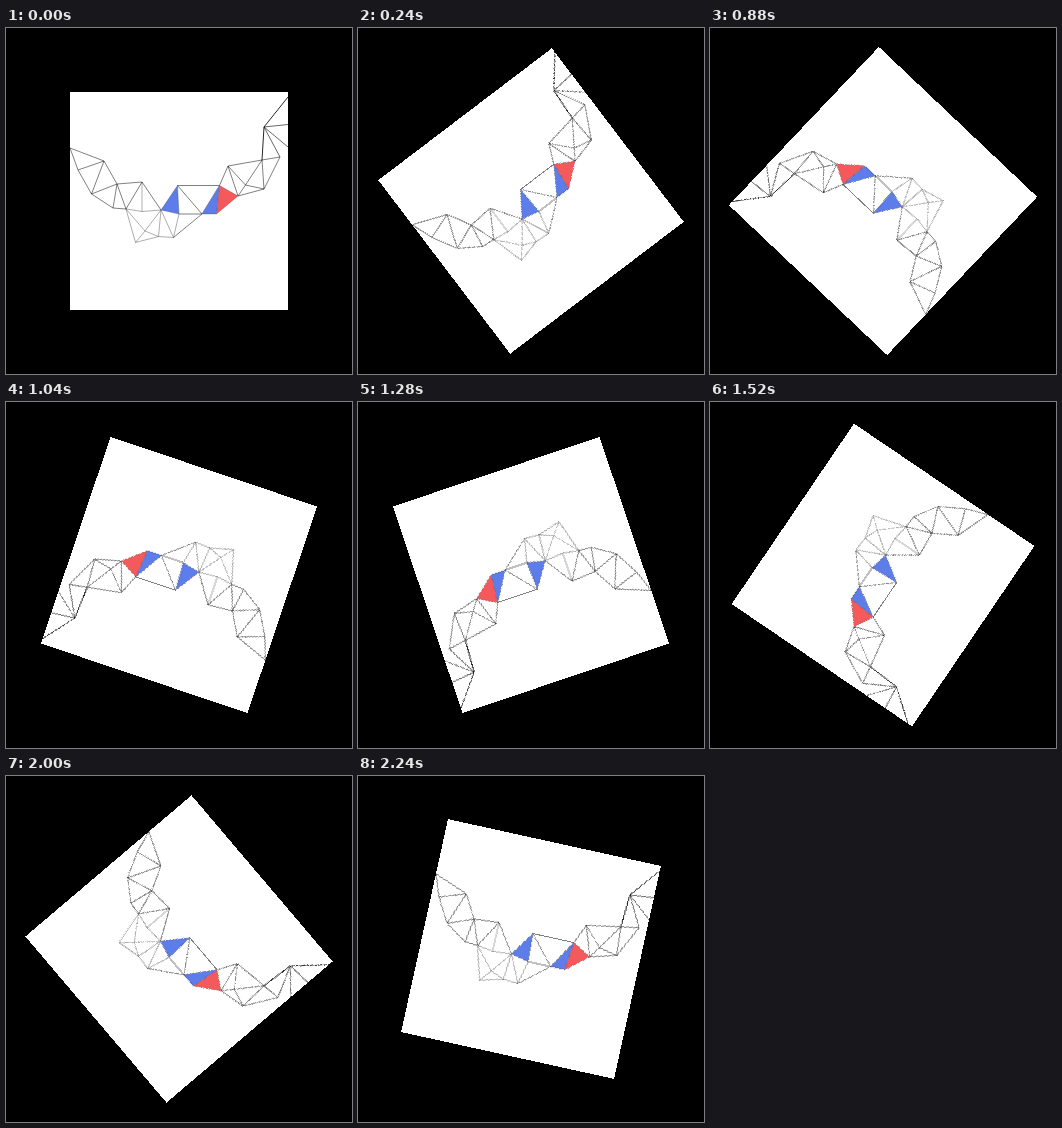
An HTML page with a canvas for the animation above (2.32 s loop, 346x346 px).

```html
<!DOCTYPE html>
<html lang="en">
<head>
<meta charset="utf-8">
<title>Rotating triangle strip</title>
<style>
  html, body { margin: 0; width: 100%; height: 100%; overflow: hidden; background: #000; }
  canvas { display: block; }
</style>
</head>
<body>
<canvas id="stage" width="346" height="346"></canvas>
<script>
const SIZE = 346, MID = SIZE / 2, STEP = 80, STEPS = 29;

const points = {
  A: [64, 120], B: [98, 133], C: [72, 142], D: [85.5, 166], E: [111, 156],
  F: [107, 180], G: [120, 181], H: [136, 154], I: [136, 183.5], J: [155, 182],
  K: [129.5, 214.5], L: [167.5, 209.5], M: [152.5, 208.5], N: [139, 203],
  P: [196, 186], Q: [173, 186], R: [171.5, 157.5], S: [213.5, 157.5],
  T: [210.5, 186], U: [232, 168], V: [222, 138], W: [256, 132], X: [258, 161],
  Y: [239.5, 157], Z: [274, 129], a: [258, 99], b: [282, 69], c: [282, 96.5], d: [282, 119]
};

// The sheet is drawn once, then turned without smoothing for crisp pixels.
const sheet = document.createElement('canvas');
sheet.width = sheet.height = SIZE;
const pen = sheet.getContext('2d');

function trace(lines) {
  pen.beginPath();
  for (const line of lines.split(' '))
    [...line].forEach((key, i) => pen[i ? 'lineTo' : 'moveTo'](...points[key]));
}

function stroke(lines, color, width) {
  trace(lines);
  pen.strokeStyle = color;
  pen.lineWidth = width;
  pen.stroke();
}

function fill(lines, color) {
  trace(lines);
  pen.fillStyle = color;
  pen.fill();
}

pen.lineJoin = 'round';
pen.fillStyle = '#000';
pen.fillRect(0, 0, SIZE, SIZE);
pen.beginPath();
pen.rect(64, 64, 218, 218);
pen.clip();
pen.fillStyle = '#fff';
pen.fill();

stroke('GIJ HI GKNJ GNMK MJ MLJ LQ', '#333', 0.4);
stroke('ABCA CDB BED DFE FGE EHG HJ RPQ RSP LP SVU VWYV UYX UXW XZW', '#000', 0.5);
stroke('Zac ad', '#000', 0.6);
stroke('Wab', '#000', 0.85);
fill('JRQ PST', '#5d7deb');
fill('STU', '#f45a5b');
stroke('JRQJ PTS TUS', '#222', 0.25);

const ctx = document.getElementById('stage').getContext('2d');
ctx.imageSmoothingEnabled = false;

function frame(now) {
  const step = Math.floor(now / STEP) % STEPS;
  ctx.resetTransform();
  ctx.fillStyle = '#000';
  ctx.fillRect(0, 0, SIZE, SIZE);
  ctx.translate(MID, MID);
  ctx.rotate(-2 * Math.PI * step / STEPS);
  ctx.drawImage(sheet, -MID, -MID);
  requestAnimationFrame(frame);
}
frame(performance.now());
</script>
</body>
</html>
```
